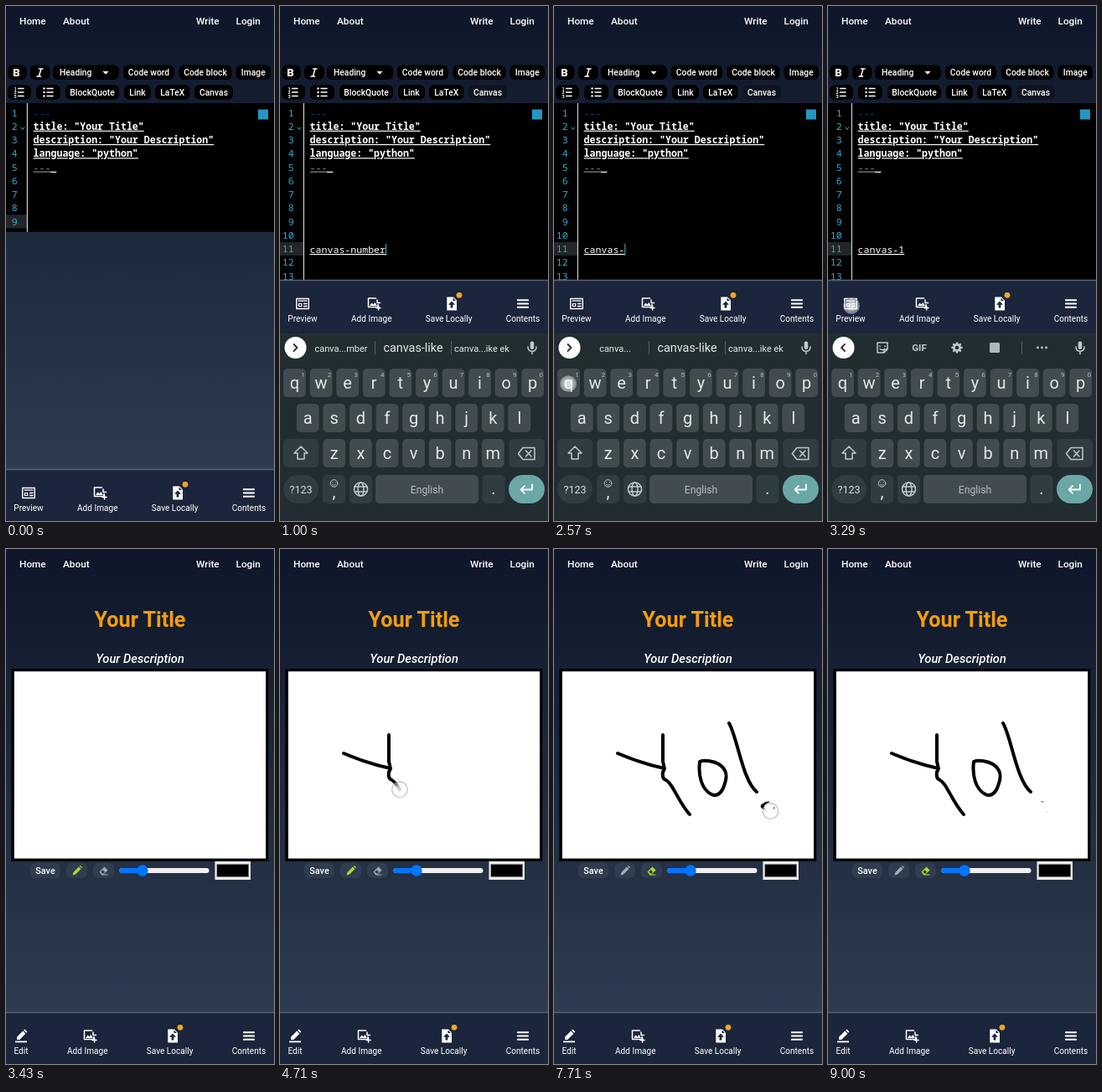
Animation, 320 px wide and 615 px high, one loop 9140 ms. Source, as an HTML page:

```html
<!DOCTYPE html>
<html lang="en">
<head>
<meta charset="utf-8">
<title>Canvas editor demo</title>
<style>
html, body { margin: 0; width: 100%; height: 100%; overflow: hidden; background: #0f172a; }
svg { display: block; width: 100%; height: 100%; font-family: Roboto, sans-serif; }
text { fill: #fff; white-space: pre; }
.mid { text-anchor: middle; }
.end { text-anchor: end; }
.nav { font-size: 11.8px; font-weight: 500; }
.tool { font-size: 10.3px; font-weight: 500; }
.label { font-size: 10.1px; }
.code, .num { font: 11.6px "Noto Sans Mono", "DejaVu Sans Mono", monospace; }
.bold { font-weight: 600; }
.num { fill: #35abd0; }
.key { font-size: 20px; fill: #e3e8ea; }
.small { font-size: 8px; fill: #b4bec2; }
.line { fill: none; stroke: #fff; stroke-width: 1.5; stroke-linecap: round; stroke-linejoin: round; }
.ink { fill: none; stroke: #000; stroke-width: 4; stroke-linecap: round; stroke-linejoin: round; stroke-dasharray: 1 2; }
.dim { stroke: #c0c9cc; }
[hidden] { display: none; }
</style>
</head>
<body>
<svg viewBox="0 0 320 615" preserveAspectRatio="none">
  <defs>
    <linearGradient id="sky" x2="0" y2="1">
      <stop stop-color="#0e1629"/><stop offset="1" stop-color="#314055"/>
    </linearGradient>
    <radialGradient id="glow">
      <stop offset=".3" stop-color="#fff" stop-opacity=".8"/><stop offset="1" stop-color="#fff" stop-opacity=".35"/>
    </radialGradient>
  </defs>
  <rect width="320" height="615" fill="url(#sky)"/>
  <g id="nav"></g>
  <g id="editor"></g>
  <g id="preview"></g>
  <g id="bar"></g>
  <g id="keyboard"></g>
  <g id="touch" hidden>
    <circle r="9.3" fill="url(#glow)" stroke="#9a9fb8" stroke-opacity=".75" stroke-width="1.1"/>
  </g>
</svg>
<script>
const $ = id => document.getElementById(id);
const text = (x, y, s, cls, more = '') => `<text x="${x}" y="${y}" class="${cls}" ${more}>${s}</text>`;
const rect = (x, y, w, h, fill, r = 0, more = '') =>
  `<rect x="${x}" y="${y}" width="${w}" height="${h}" rx="${r}" fill="${fill}" ${more}/>`;
const line = (d, more = '', cls = '') => `<path class="line ${cls}" d="${d}" ${more}/>`;
const shape = (d, fill = '#fff', more = '') => `<path d="${d}" fill="${fill}" ${more}/>`;
const at = (x, y, s) => `<g transform="translate(${x} ${y})">${s}</g>`;
const show = (id, on) => $(id).toggleAttribute('hidden', !on);

const FRAME = 1000 / 7, LOOP = 9140, PITCH = 16.25;

$('nav').innerHTML = [['Home', 16], ['About', 68], ['Write', 227], ['Login', 274.5]]
  .map(([s, x]) => text(x, 22, s, 'nav')).join('');

// Editor
const pill = (x, y, w, s = '', id = '') =>
  rect(x, y, w, 17.5, '#000', 6, id && `id="${id}"`) + text(x + w / 2, y + 12.4, s, 'tool mid');

const toolbar =
  pill(2, 70.5, 22.5) + text(12.5, 84, 'B', 'mid', 'font-size="13" font-weight="900"') +
  pill(29, 70.5, 23.5) + line('M39.5 75H44M37 84H41.5M42 75L39.3 84', 'stroke-width="2"') +
  pill(56, 70.5, 79) + text(64, 82.9, 'Heading', 'tool') + shape('M115.5 78h7l-3.5 3.7z') +
  pill(140, 70.5, 61, 'Code word') + pill(206.5, 70.5, 63, 'Code block') + pill(274.5, 70.5, 41.5, 'Image') +
  pill(2, 94.2, 28) + pill(36, 94.2, 29) +
  [98.5, 103, 107.5].map((y, i) =>
    text(11, y + 2, i + 1, 'mid', 'font-size="5.5" font-weight="700"') + line(`M14.5 ${y}H21`) +
    `<circle cx="45.5" cy="${y}" r="1.2" fill="#fff"/>` + line(`M49 ${y}H56`)).join('') +
  pill(71, 94.2, 64, 'BlockQuote') + pill(141, 94.2, 32, 'Link') +
  pill(178, 94.2, 41.5, 'LaTeX') + pill(225, 94.2, 46, 'Canvas', 'canvasButton');

function codePage(count, active, gutter) {
  const x = gutter + 7.6, base = n => 131.5 + (n - 1) * PITCH;
  const height = count * PITCH + 7.5;
  const numbers = Array.from({ length: count }, (_, i) => text(gutter - 11.3, base(i + 1), i + 1, 'num end'));
  const header = ['title: "Your Title"', 'description: "Your Description"', 'language: "python"']
    .map((s, i) => text(x, base(i + 2), s, 'code bold', 'text-decoration="underline"'));
  return rect(0, 116, 320, height, '#000') +
    rect(0, base(active) - 12.3, gutter, PITCH, '#222626') +
    rect(gutter - .2, 116, 1.2, height, '#c9ced0') +
    numbers.join('') + header.join('') +
    line(`M${gutter - 7} 145l1.8 2.5 1.8-2.5`, 'style="stroke:#35abd0;stroke-width:1"') +
    text(x, base(1), '---', 'code', 'style="fill:#173a80"') +
    text(x, base(5), '---', 'code', 'style="fill:#8d8d8d" text-decoration="underline"') +
    rect(x + 20.5, base(5) + 1.2, 7.2, 1.3, '#eee') +
    rect(301, 123.5, 12, 12, '#2596c4');
}
$('editor').innerHTML = toolbar +
  `<g id="shortPage">${codePage(9, 9, 25)}</g>` +
  `<g id="longPage">${codePage(13, 11, 28)}${text(35.6, 295, '', 'code', 'id="word" text-decoration="underline"')}` +
  rect(0, 284, 1, 14, '#4fb6c8', 0, 'id="caret"') + '</g>';

// Preview page
const pencil = '<path d="M-5 5l1-3.5 6.5-6.5 2.5 2.5-6.5 6.5zM3.3-5.7l1-.8 2.3 2.3-.9.9z"/>';
const eraser = '<path fill-rule="evenodd" d="M-5 1.5L1-4.5 5-.5 0 4.5H5V5.5H-2zM-3.2 1.5L-1 3.8H-.4L1.6 1.8-1-.8z"/>';
const strokes = [
  { from: 27, to: 30, d: 'M76 244Q104 256 132 262' },
  { from: 31, to: 34, d: 'M130 222V254Q133 264 130 266Q129 273 132 275C142 279 147 300 162 317' },
  { from: 35, to: 38, d: 'M174 254C180 251 192 254 197 257C206 263 208 271 203 283C200 292 194 296 188 293C176 287 172 270 174 254' },
  { from: 39, to: 40, d: 'M209 208C219 225 225 276 242 290' },
  { from: 41, to: 45, d: 'M251 309Q247 307 250 306Q257 300 262 308Q262 313 255 312Q252 310 257 308' },
  { from: 52, to: 60, d: 'M262 304L255 308 259 313 250 312 247 306 254 306 262 308 257 312 250 309', erase: true },
];
$('preview').innerHTML =
  text(160, 93, 'Your Title', 'mid', 'font-size="25.2" font-weight="700" style="fill:#f59e0b"') +
  text(160, 136, 'Your Description', 'mid', 'font-size="14.7" font-weight="500" font-style="italic"') +
  rect(6.3, 143, 307, 230, '#000') + rect(9.8, 146.2, 300.4, 223.4, '#fff') +
  strokes.map((s, i) => `<path id="stroke${i}" class="ink" pathLength="1" d="${s.d}" ${
    s.erase ? 'style="stroke:#fff;stroke-width:8"' : ''}/>`).join('') +
  '<g id="specks" fill="#c9c9c9"><circle cx="255" cy="302.5" r=".7"/><circle cx="261" cy="314" r=".7"/></g>' +
  [[29, 36], [72, 25], [104, 25]].map(([x, w]) => rect(x, 375, w, 18, '#303c50', 6)).join('') +
  text(47, 388, 'Save', 'mid', 'font-size="10.8" font-weight="500"') +
  `<g id="pencil" transform="translate(84.5 384.5)">${pencil}</g>` +
  `<g id="eraser" transform="translate(116.5 384)">${eraser}</g>` +
  rect(135.5, 381, 107, 6, '#efefef', 3) + rect(135.5, 381, 28, 6, '#0075ff', 3) +
  '<circle cx="163" cy="384" r="6.7" fill="#0075ff"/>' +
  rect(249.5, 373, 42.5, 22, '#efefef') + rect(251.8, 376.5, 38, 15, '#000', 0, 'stroke="#999" stroke-width=".6"');

// Bottom bar; drawn with its top edge at y = 0
const icons = {
  preview: line('M-7.3-6H7.3V6H-7.3z', 'style="stroke-width:1.4"') + line('M-5-3.3H5M1.5 0H5M1.5 3H5', 'style="stroke-width:1.3"') +
    line('M-4.6 0H-1.3V3H-4.6z', 'style="stroke-width:1.2"'),
  edit: shape('M-5 4.5V1.3L2.2-6 5.4-2.8-1.8 4.5zM3-6.8L4.4-8 7.4-5 6.2-3.7z') + rect(-7, 6, 14, 1.8, '#fff'),
  image: line('M2.5-6.5H-6.5V4H5V1', 'style="stroke-width:1.5"') + line('M4-4.5V-1H7.5M5.6 2.5V7.5M3 5H8', 'style="stroke-width:1.5"') +
    shape('M-5 2.5L-2.5-1-.5 1 1.3-1.5 4 2.5z'),
  save: shape('M-5.7-8H2L6-4V8H-5.7z') + shape('M0-3L4 1.2H1.4V5H-1.4V1.2H-4z', '#1b253b') + shape('M1.5-7V-3.5H5z', '#1b253b'),
  menu: line('M-6.2-4.2H6.2M-6.2 0H6.2M-6.2 4.2H6.2', 'style="stroke-width:1.9"'),
};
const barItems = items => items.map(([icon, iconX, s, x]) =>
  at(iconX, 28.5, icons[icon]) + text(x, 50, s, 'label mid') +
  (icon === 'save' ? `<circle cx="${iconX + 9}" cy="18.3" r="3.4" fill="#f5a623"/>` : '')).join('');
$('bar').innerHTML = rect(0, 0, 320, 64, '#1b253b') + rect(0, -.3, 320, 1.6, '#56606c') +
  `<g id="editBar">${barItems([['preview', 27, 'Preview', 27], ['image', 112, 'Add Image', 109.3],
    ['save', 205, 'Save Locally', 201.6], ['menu', 290, 'Contents', 290]])}</g>` +
  `<g id="viewBar">${barItems([['edit', 18, 'Edit', 18], ['image', 100, 'Add Image', 97.3],
    ['save', 199, 'Save Locally', 195.6], ['menu', 290, 'Contents', 290]])}</g>`;

// Keyboard
const KEY = '#414b50', SIDE = '#313c41';
const row = (letters, x0, y, numbered) => [...letters].map((c, i) => {
  const x = x0 + i * 31.58;
  return rect(x - 13.4, y, 26.8, 34, KEY, 5) + text(x, y + 24, c, 'key mid') +
    (numbered ? text(x + 10, y + 9.5, (i + 1) % 10, 'small mid') : '');
}).join('');
const chevron = (id, d) => line(d, `id="${id}" style="stroke:#263035;stroke-width:1.8"`);
const suggestion = (x, size, id, s) => text(x, 413, s, 'mid', `id="${id}" font-size="${size}" style="fill:#e3e8ea"`);
const gearTeeth = Array.from({ length: 8 }, (_, i) =>
  `<path class="line dim" d="M0-4.8V-5.6" transform="rotate(${i * 45})" style="stroke-width:2.4"/>`).join('');

$('keyboard').innerHTML = rect(0, 391, 320, 224, '#222d32') +
  '<circle cx="18.5" cy="408" r="13" fill="#fff"/>' +
  chevron('chevronRight', 'M16.5 404l4 4-4 4') + chevron('chevronLeft', 'M20 404l-4 4 4 4') +
  '<g id="suggestions">' + suggestion(73, 11, 'typed', '') + suggestion(159, 14.4, 'guess', 'canvas-like') +
  suggestion(241, 11, 'other', 'canva...ike ek') +
  rect(113, 400, 1, 16, '#556066') + rect(204, 400, 1, 16, '#556066') + '</g>' +
  '<g id="shortcuts">' +
  at(65, 408, line('M-6-6H6V2L2 6H-6zM6 2H2V6M-3-2V-1.5M3-2V-1.5M-3 1.5Q0 4 2.5 1.5', '', 'dim')) +
  text(109, 412, 'GIF', 'mid', 'font-size="11.5" font-weight="700" style="fill:#c0c9cc"') +
  at(154, 408, gearTeeth + '<circle r="3.6" class="line dim" style="stroke-width:2.6"/>') +
  rect(193, 402, 12, 12, '#aeb8bc', 1.5) + rect(231, 400, 1, 16, '#556066') +
  [250.5, 255.5, 260.5].map(x => `<circle cx="${x}" cy="408" r="1.4" fill="#c0c9cc"/>`).join('') + '</g>' +
  at(301, 408, rect(-2.3, -7.5, 4.6, 9.5, '#c0c9cc', 2.3) + line('M-5-1Q-5 4.3 0 4.3T5-1M0 4.5V7.5', '', 'dim')) +
  row('qwertyuiop', 17.5, 433, true) + row('asdfghjkl', 33.2, 475) + row('zxcvbnm', 64.8, 517) +
  rect(4, 517, 42, 34, SIDE, 5) + line('M25 526l-8 8h4v7h8v-7h4z', '', 'dim') +
  rect(273.5, 517, 42.5, 34, SIDE, 5, 'id="backspace"') +
  line('M290 527.5H304V541.5H290L284.5 534.5zM293.5 531l6.5 7M300 531l-6.5 7', '', 'dim') +
  rect(4, 560, 42, 34, SIDE, 17) + text(25, 582, '?123', 'mid', 'font-size="12.5" style="fill:#d5dcdf"') +
  rect(51, 560, 27, 34, SIDE, 5) + text(64.5, 587, ',', 'key mid') +
  '<circle cx="64.5" cy="570" r="4.3" class="line dim" style="stroke-width:1"/>' +
  line('M62.8 569V568.7M66.2 569V568.7M62.5 571.5Q64.5 573.5 66.5 571.5', 'style="stroke-width:.9"', 'dim') +
  rect(83, 560, 27, 34, SIDE, 5) +
  at(96.5, 577, '<circle r="8" class="line dim"/><ellipse rx="3.5" ry="8" class="line dim"/>' + line('M-7.4-3H7.4M-7.4 3H7.4', '', 'dim')) +
  rect(114, 560, 123, 34, KEY, 5) + text(175.5, 581.5, 'English', 'mid', 'font-size="12.2" style="fill:#b4bec2"') +
  rect(241.5, 560, 27, 34, SIDE, 5) + text(255, 583, '.', 'key mid') +
  rect(273, 560, 43, 34, '#6ba7a6', 17) + line('M301 571.5V577.5H288M292 573.2L287.7 577.5 292 581.8', 'style="stroke-width:1.8"');

// Finger rests: first step, last step, x, y
const taps = [[2, 3, 248, 103], [5, 5, 92, 291], [11, 14, 296, 536], [17, 18, 17, 451],
  [22, 23, 28, 358], [48, 49, 117, 384]];
const suffixes = { 11: 'number', 12: 'numbe', 13: 'num', 14: 'nu' };
const suffixAt = k => k < 11 ? 'number' : k >= 19 ? '1' : suffixes[k] || '';

function placeTouch(point) {
  show('touch', point);
  if (point) $('touch').setAttribute('transform', `translate(${point.x} ${point.y})`);
}

function drawStrokes(k) {
  let finger = null;
  strokes.forEach((s, i) => {
    const el = $('stroke' + i), p = Math.min(1, Math.max(0, (k - s.from) / (s.to - s.from)));
    show(el.id, k >= s.from);
    el.style.strokeDashoffset = 1 - p;
    if (k >= s.from && k <= s.to) finger = el.getPointAtLength(el.getTotalLength() * p);
  });
  return finger;
}

function render(k) {
  const editing = k < 24, typing = k >= 6 && editing, suggesting = k >= 7 && k < 19;
  const erasing = k >= 49, suffix = suffixAt(k);
  show('editor', editing);
  show('editBar', editing);
  show('preview', !editing);
  show('viewBar', !editing);
  show('keyboard', typing);
  show('shortPage', k < 3);
  show('longPage', k >= 3);
  $('bar').setAttribute('transform', `translate(0 ${typing ? 327 : 553})`);
  $('canvasButton').setAttribute('fill', k >= 2 ? '#10141f' : '#000');

  $('word').textContent = 'canvas-' + suffix;
  $('typed').textContent = 'canva...' + suffix.slice(-4);
  $('caret').setAttribute('x', 35.6 + 6.96 * (7 + suffix.length));
  show('caret', typing && k < 21);
  show('suggestions', suggesting);
  show('chevronRight', suggesting);
  show('shortcuts', !suggesting);
  show('chevronLeft', !suggesting);
  $('backspace').setAttribute('fill', k >= 11 && k <= 14 ? '#566066' : SIDE);

  $('pencil').setAttribute('fill', erasing ? '#a3acb9' : '#a4de2f');
  $('eraser').setAttribute('fill', erasing ? '#a4de2f' : '#a3acb9');
  show('specks', k >= 58);
  const tap = taps.find(([from, to]) => k >= from && k <= to);
  placeTouch(drawStrokes(k) || (tap && { x: tap[2], y: tap[3] }));
}

let start, last;
function tick(now) {
  start ??= now;
  const k = Math.min(63, Math.floor(((now - start) % LOOP + 5) / FRAME));
  if (k !== last) render(last = k);
  requestAnimationFrame(tick);
}
render(0);
requestAnimationFrame(tick);
</script>
</body>
</html>
```
